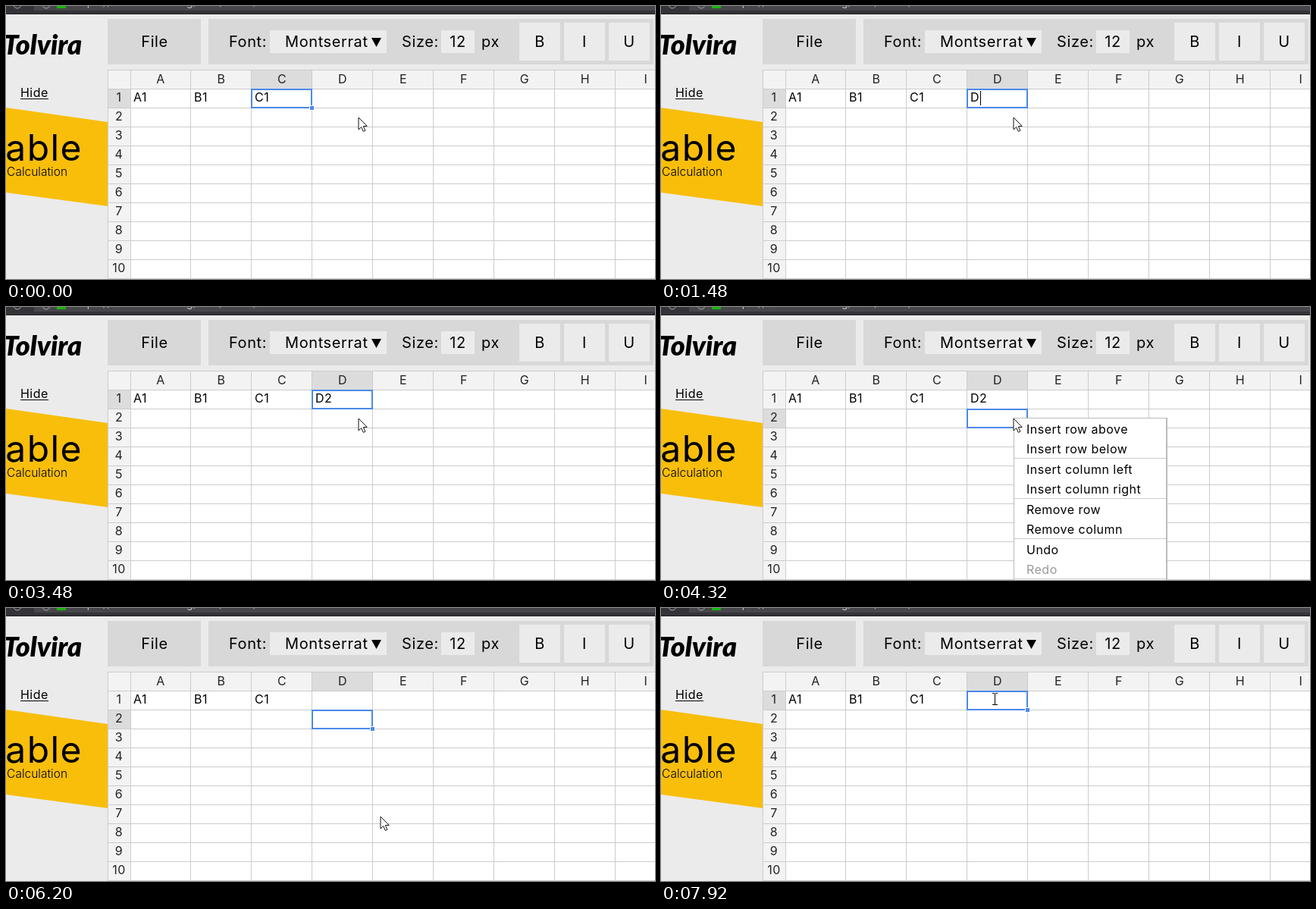
Animation, 856 px wide and 360 px high, one loop 8 s. Source, as an HTML page with a canvas:

```html
<!DOCTYPE html>
<html lang="en">
<head>
<meta charset="utf-8">
<title>Table calculation</title>
<style>
  html, body { margin: 0; width: 100%; height: 100%; overflow: hidden; background: #ebebeb; }
  canvas { display: block; }
</style>
</head>
<body>
<canvas id="stage" width="856" height="360"></canvas>
<script>
const ctx = document.getElementById('stage').getContext('2d');
const LOOP = 8000;
const LEFT = 164, TOP = 109, COL = 80, ROW = 25;
const BLUE = '#4b89e8', LINE = '#cccccc', PAGE = '#ebebeb';

// Moments of the user's actions, in ms
const T = { arrowKey: 280, typeD: 1360, type2: 1700, enter: 3640, menu: 4240, undo: 5560, click: 7440 };

const MENU = ['Insert row above', 'Insert row below', 'Insert column left', 'Insert column right',
              'Remove row', 'Remove column', 'Undo', 'Redo'];

// Pointer path: [time, x, y]
const PATH = [[0, 465, 147], [4400, 465, 147], [5000, 527, 336], [5160, 527, 336],
              [5440, 522, 317], [5640, 522, 317], [6120, 494, 275], [6760, 494, 275], [7260, 440, 120]];

function rect(color, x, y, w, h) {
  ctx.fillStyle = color;
  ctx.fillRect(x, y, w, h);
}

function poly(color, points) {
  ctx.beginPath();
  points.forEach(([x, y]) => ctx.lineTo(x, y));
  ctx.closePath();
  ctx.fillStyle = color;
  ctx.fill();
}

function text(str, x, y, { size = 16, align = 'left', color = '#000', spacing = 0.03, style = '', family = 'Inter' } = {}) {
  ctx.font = `${style} ${size}px ${family}, sans-serif`;
  ctx.letterSpacing = size * spacing + 'px';
  ctx.textAlign = align;
  ctx.fillStyle = color;
  ctx.fillText(str, x, y);
}

function pointerAt(t) {
  const next = PATH.findIndex(p => p[0] > t);
  if (next < 0) return PATH[PATH.length - 1].slice(1);
  const [t0, x0, y0] = PATH[next - 1], [t1, x1, y1] = PATH[next];
  const u = (t - t0) / (t1 - t0), k = u * u * (3 - 2 * u);
  return [x0 + (x1 - x0) * k, y0 + (y1 - y0) * k];
}

function drawBrowserBar() {
  rect('#343338', 0, 0, 856, 11);
  rect('#47464a', 37, 0, 819, 6);
  rect('#1d1c20', 0, 10, 856, 1);
  ctx.strokeStyle = '#aaaaad';
  ctx.lineWidth = 1;
  for (const x of [15, 53]) {
    ctx.beginPath();
    ctx.arc(x, -2, 5, 0, Math.PI);
    ctx.stroke();
  }
  rect('#16b800', 67, 0, 12, 3);
  text('https://table-sheet.org/calc/demo/', 88, 0, { size: 14, color: '#c9c9cc' });
}

function drawSidebar() {
  text('Tolvira', 100, 64, { size: 36, align: 'right', spacing: 0, style: 'italic 900', family: 'Lato' });
  text('Hide', 19, 120);
  rect('#000', 19, 122, 37, 1);
  poly('#f8be0a', [[0, 134], [134, 153], [134, 264], [0, 246]]);
  text('Table', 101, 204, { size: 48, align: 'right' });
  text('Calculation', 81, 224, { size: 15.5, align: 'right', spacing: 0, style: '300' });
}

function drawToolbar() {
  const big = { size: 20 }, mid = { size: 20, align: 'center' };
  rect('#d8d8d8', 134, 17, 123, 60);
  rect('#d8d8d8', 267, 17, 587, 60);
  rect(PAGE, 348, 32, 154, 30);
  rect(PAGE, 574, 32, 44, 30);
  text('File', 196, 54, mid);
  text('Font:', 294, 54, big);
  text('Montserrat', 368, 54, big);
  poly('#000', [[482, 42], [495, 42], [488.5, 54]]);
  text('Size:', 522, 54, big);
  text('12', 596, 54, mid);
  text('px', 627, 54, big);
  [...'BIU'].forEach((letter, i) => {
    rect(PAGE, 677 + i * 59, 22, 54, 50);
    text(letter, 704 + i * 59, 54, mid);
  });
}

function drawGrid(col, row, d1) {
  const header = { align: 'center', color: '#222' };
  const shade = on => on ? '#dcdcdc' : '#f3f3f3';
  rect('#fff', 134, 84, 722, 276);
  rect(shade(false), 134, 84, 30, 25);
  for (let i = 0; i < 9; i++) {
    const x = LEFT + i * COL;
    rect(shade(i === col), x, 84, COL, 25);
    text('ABCDEFGHI'[i], x + 40, 102, header);
  }
  for (let i = 0; i < 10; i++) {
    const y = TOP + i * ROW;
    rect(shade(i === row), 134, y, 30, ROW);
    text(i + 1, 149, y + 17, header);
  }
  rect(LINE, 134, 84, 722, 1);
  rect(LINE, 134, 84, 1, 276);
  rect(LINE, 164, 84, 1, 276);
  for (let x = 243; x < 856; x += COL) rect(LINE, x, 84, 1, 276);
  for (let y = TOP; y < 360; y += ROW) rect(LINE, 134, y, 722, 1);
  ['A1', 'B1', 'C1', d1].forEach((value, i) => text(value, 168 + i * COL, 126));
}

function drawSelection(col, row, editing) {
  const x = 163 + col * COL, y = TOP + row * ROW;
  ctx.strokeStyle = BLUE;
  ctx.lineWidth = 2;
  ctx.strokeRect(x + 1, y + 1, 79, 24);
  if (editing) return;
  rect('#fff', x + 77, y + 22, 7, 7);
  rect(BLUE, x + 78, y + 23, 5, 5);
}

function drawMenu(pointerY) {
  rect('#bbbbbb', 465, 146, 203, 214);
  rect('#fff', 466, 147, 200, 213);
  MENU.forEach((label, i) => {
    const y = 147 + i * 26 + (i >> 1), disabled = label === 'Redo';
    if (!disabled && pointerY > 148 && pointerY >= y && pointerY < y + 26) rect('#e9e9e9', 466, y, 200, 26);
    text(label, 482, y + 20, { color: disabled ? '#999' : '#000' });
    if (i % 2) rect(LINE, 466, y + 26, 200, 1);
  });
}

function drawPointer([x, y], beam) {
  if (beam) {
    rect('#000', x, y - 7, 1, 15);
    for (const end of [-8, 7]) {
      rect('#000', x - 3, y + end, 3, 1);
      rect('#000', x + 1, y + end, 3, 1);
    }
    return;
  }
  const shape = [[0, 0], [0, 16], [3.7, 12.6], [6.3, 18.4], [8.9, 17.2], [6.3, 11.6], [11.2, 11.4]];
  poly('#fff', shape.map(([dx, dy]) => [x + dx, y + dy]));
  ctx.strokeStyle = '#111';
  ctx.lineWidth = 1;
  ctx.stroke();
}

function draw(t) {
  const col = t < T.arrowKey ? 2 : 3;
  const row = t >= T.enter && t < T.click ? 1 : 0;
  const editing = t >= T.typeD && t < T.enter;
  const d1 = t < T.typeD || t >= T.undo ? '' : t < T.type2 ? 'D' : 'D2';
  const pointer = pointerAt(t);

  rect(PAGE, 0, 0, 856, 360);
  drawBrowserBar();
  drawSidebar();
  drawToolbar();
  drawGrid(col, row, d1);
  drawSelection(col, row, editing);
  const sinceKey = t - (t < T.type2 ? T.typeD : T.type2);
  if (editing && sinceKey % 1000 < 500) rect('#000', d1 === 'D' ? 421 : 430, 112, 1, 19);
  if (t >= T.menu && t < T.undo) drawMenu(pointer[1]);
  drawPointer(pointer, t >= T.click);
}

function tick() {
  draw(performance.now() % LOOP);
  requestAnimationFrame(tick);
}
tick();
</script>
</body>
</html>
```
